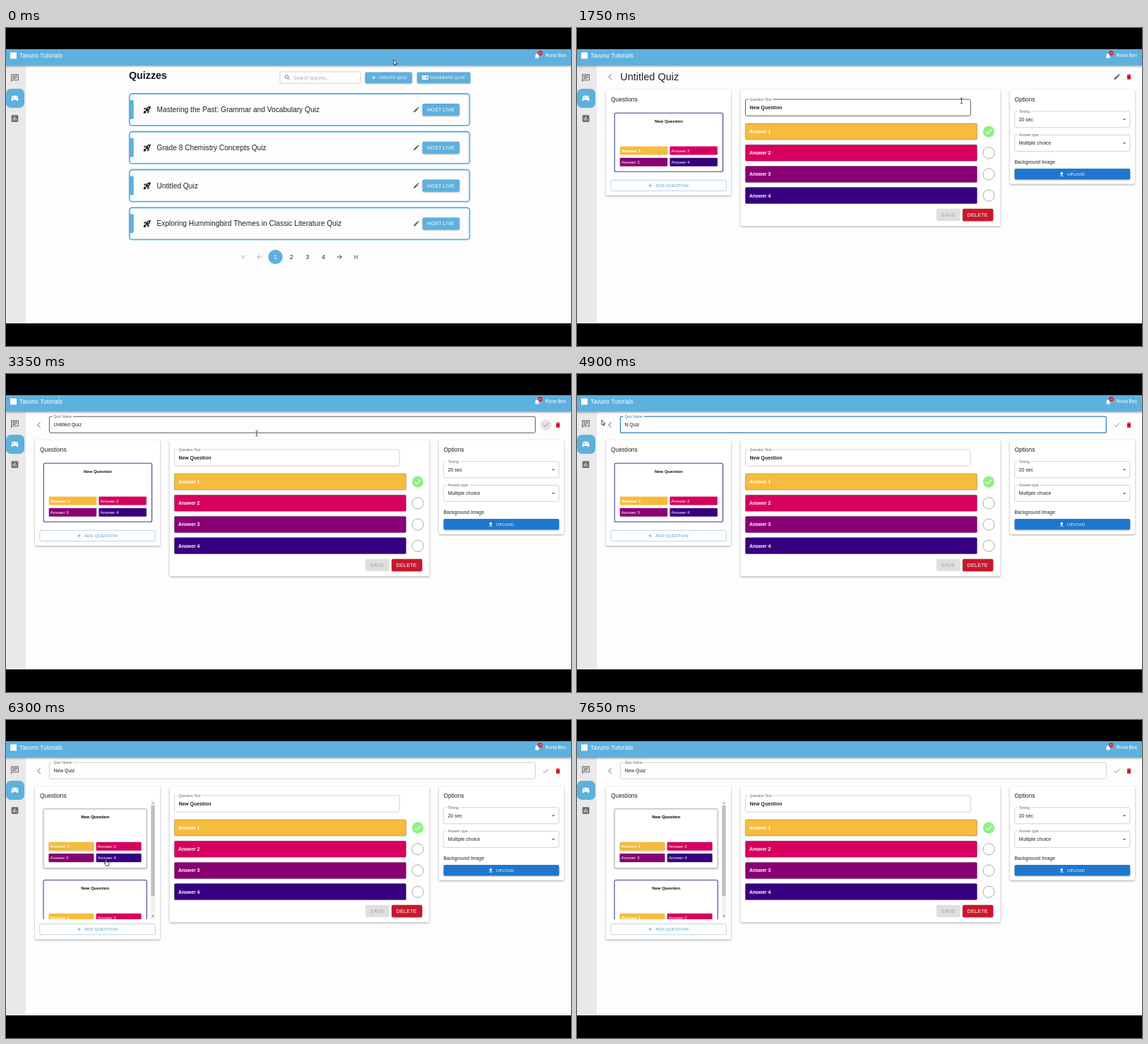
An HTML page with a canvas that plays this animation: 800 by 450 pixels, repeating every 7.7 s.

```html
<!DOCTYPE html>
<html lang="en">
<head>
<meta charset="utf-8">
<title>Quiz editor</title>
<style>
html, body { margin: 0; width: 100%; height: 100%; overflow: hidden; background: #000; }
canvas { display: block; width: 800px; height: 450px; }
</style>
</head>
<body>
<canvas id="stage"></canvas>
<script>
const LOOP = 7700;
const canvas = document.getElementById('stage');
const ctx = canvas.getContext('2d');
const dpr = window.devicePixelRatio || 1;
canvas.width = 800 * dpr;
canvas.height = 450 * dpr;

const BLUE = '#5eb0dd', INK = '#222', GREY = '#6b6b6b', LINE = '#c6c6c6', RED = '#c8182c';
const ANSWERS = ['#f6bc3d', '#d7005f', '#880073', '#370080'];
const TITLES = ['Mastering the Past: Grammar and Vocabulary Quiz', 'Grade 8 Chemistry Concepts Quiz',
  'Untitled Quiz', 'Exploring Hummingbird Themes in Classic Literature Quiz'];

// Moments of the story, in ms
const AT = { insert: 750, editor: 1450, rename: 3250, focus: 3950, drag: 4150,
  typeN: 4850, typeE: 5050, typeW: 5200, add: 5950 };

// Pointer path: time, x, y
const PATH = [
  [0, 549, 45], [100, 549, 46], [400, 541, 70], [750, 541, 70], [1200, 543.5, 93],
  [1750, 544.5, 103], [2050, 545, 104], [2450, 650, 112], [2900, 764, 69], [3250, 764, 70],
  [3350, 355, 84], [3900, 93, 73], [4150, 91, 72], [4650, 36, 66], [4900, 35, 65], [5250, 35, 65],
  [5800, 140, 224], [6000, 140, 223], [6300, 140, 197.5], [6700, 139, 190], [7300, 110, 18], [7700, 110, 10]
];

function text(s, x, y, size, color = INK, o = {}) {
  ctx.font = `${o.bold ? 'bold ' : ''}${size}px "Liberation Sans", Arial, sans-serif`;
  ctx.letterSpacing = (o.caps ? size * 0.028 : 0) + 'px';
  ctx.textAlign = o.align || 'left';
  ctx.fillStyle = color;
  ctx.fillText(s, x, y + size * 0.36);
}

function box(x, y, w, h, r, fill, stroke, lw = 1) {
  ctx.beginPath();
  ctx.roundRect(x, y, w, h, r);
  if (fill) { ctx.fillStyle = fill; ctx.fill(); }
  if (stroke) { ctx.strokeStyle = stroke; ctx.lineWidth = lw; ctx.stroke(); }
}

function raised(blur, alpha, draw) {
  ctx.save();
  ctx.shadowColor = `rgba(0,0,0,${alpha})`;
  ctx.shadowBlur = blur * dpr;
  ctx.shadowOffsetY = dpr;
  draw();
  ctx.restore();
}

function disc(x, y, r, fill, stroke) {
  ctx.beginPath();
  ctx.arc(x, y, r, 0, 7);
  if (fill) { ctx.fillStyle = fill; ctx.fill(); }
  if (stroke) { ctx.strokeStyle = stroke; ctx.lineWidth = 1; ctx.stroke(); }
}

// Icons live on a 24-unit grid; the second entry is a stroke width, 0 for filled
const ICONS = {
  edit: ['M3 17V21H7L18 10 14 6ZM15 5 18 2.5 21.5 6 19 9Z', 0],
  trash: ['M6 7H18V21H6ZM5 4H8.5L9.5 3H14.5L15.5 4H19V6H5Z', 0],
  check: ['M4 12.5 9 17.5 20 6.5', 2],
  plus: ['M12 5V19M5 12H19', 2],
  search: ['M15 9.5A5.5 5.5 0 1 1 4 9.5A5.5 5.5 0 1 1 15 9.5M14 14 20 20', 2.2],
  bell: ['M10 20H14A2 2 0 0 1 10 20M6 16V11C6 7 8 5 10.5 4.5A1.5 1.5 0 0 1 13.5 4.5C16 5 18 7 18 11V16L20 18V19H4V18Z', 0],
  chat: ['M3 3H21V17H5L3 19.5ZM6 7H18M6 10H18M6 13H14', 2],
  pad: ['M7.5 5H16.5Q20 5 20.5 8.5L21.6 16Q21.5 19 19 19 18 19 15 16H9Q6 19 5 19 2.5 19 2.4 16L3.5 8.5Q4 5 7.5 5Z', 0],
  chart: ['M5 3H19Q21 3 21 5V19Q21 21 19 21H5Q3 21 3 19V5Q3 3 5 3ZM7 10V17H9V10ZM11 7V17H13V7ZM15 13V17H17V13Z', 0],
  back: ['M20 12H5M12 5 5 12 12 19', 2],
  next: ['M4 12H19M12 5 19 12 12 19', 2],
  first: ['M7 6V18M17.5 6.5 12 12 17.5 17.5', 2],
  last: ['M17 6V18M6.5 6.5 12 12 6.5 17.5', 2],
  chevron: ['M15.5 3.5 7 12 15.5 20.5', 2.2],
  upload: ['M5 18H19V20H5ZM5 10H9V16H15V10H19L12 3Z', 0],
  drop: ['M7 10 12 15 17 10Z', 0],
  rocket: ['M7 13C9 8 13 2.5 21.3 2.7 21.5 11 16 15 11 17ZM9 6.5 5.6 12.2 2 10.7 6 6.6ZM17.5 15 11.8 18.4 13.3 22 17.5 18ZM2 22C2 18 3 15 6 15A3 3 0 0 1 9 18C9 21 6 22 2 22ZM13 9A2 2 0 0 0 17 9A2 2 0 0 0 13 9Z', 0]
};
for (const k in ICONS) ICONS[k][0] = new Path2D(ICONS[k][0]);

function icon(name, x, y, size, color) {
  const [path, lw] = ICONS[name];
  ctx.save();
  ctx.translate(x - size / 2, y - size / 2);
  ctx.scale(size / 24, size / 24);
  ctx.fillStyle = ctx.strokeStyle = color;
  ctx.lineWidth = lw;
  if (lw) ctx.stroke(path); else ctx.fill(path, 'evenodd');
  ctx.restore();
}

function button(x, y, w, h, fill) {
  raised(2, 0.35, () => box(x, y, w, h, 2, fill));
}

function card(x, y, w, h) {
  raised(3, 0.35, () => box(x, y, w, h, 2, '#fff'));
}

function field(x, y, w, h, label, value, o = {}) {
  box(x, y, w, h, 2, null, o.line || LINE, o.lw || 0.8);
  ctx.font = '5.1px "Liberation Sans", Arial, sans-serif';
  ctx.letterSpacing = '0px';
  ctx.fillStyle = '#fefefe';
  ctx.fillRect(x + 4, y - 2, ctx.measureText(label).width + 4, 4);
  text(label, x + 6, y, 5.1, o.label || '#666');
  text(value, x + 6, y + h / 2, 6.9, INK, { bold: o.bold });
}

function frame() {
  ctx.fillStyle = '#fdfdfe';
  ctx.fillRect(0, 30, 800, 388);
  ctx.fillStyle = '#e9e8ea';
  ctx.fillRect(0, 53, 28, 365);
  raised(3, 0.45, () => { ctx.fillStyle = BLUE; ctx.fillRect(0, 30, 800, 23); });
  ctx.fillStyle = '#fff';
  ctx.fillRect(6, 34.5, 9, 9);
  text('Tavuno Tutorials', 19, 39.2, 8.35, '#fff');
  icon('bell', 752, 39.5, 9.5, '#fff');
  disc(756.4, 35.5, 3.3, RED);
  text('10', 756.4, 35.5, 3.8, '#fff', { align: 'center' });
  text('Rona Bex', 763.5, 39, 6.75, '#fff');
  icon('chat', 12.5, 71, 13, GREY);
  box(0, 86, 26, 27, 7, BLUE);
  icon('pad', 12.5, 99.5, 12.5, '#fff');
  disc(10.3, 98.6, 1, BLUE);
  disc(14.8, 98.6, 0.8, BLUE);
  icon('chart', 12.5, 128, 13, GREY);
}

function listPage(t) {
  text('Quizzes', 174, 66.5, 14.3, '#161616', { bold: true });
  box(388, 62, 114, 16.4, 2, '#fff', LINE, 0.8);
  icon('search', 398.5, 70.2, 10, '#666');
  text('Search quizzes...', 407, 70.2, 6.75, '#a8a8a8');
  button(508.5, 62.5, 66.5, 15.5, BLUE);
  icon('plus', 520.5, 70.2, 9.5, '#fff');
  text('CREATE QUIZ', 527.3, 70.2, 5.85, '#fff', { caps: true });
  button(582, 62.5, 75.5, 15.5, BLUE);
  box(589, 67.3, 9, 5.8, 0.8, '#fff');
  disc(591.5, 70.2, 1, BLUE);
  ctx.fillRect(594.2, 68.8, 2.6, 2.6);
  text('GENERATE QUIZ', 600.3, 70.2, 5.85, '#fff', { caps: true });

  const rows = t < AT.insert ? TITLES : ['Untitled Quiz', ...TITLES];
  for (let i = 0; i < 4; i++) {
    const y = 93 + i * 53.75;
    box(174.8, y, 481.6, 45.2, 4, '#fefdfe', BLUE, 1.8);
    box(174.2, y + 9, 6.6, 27, [0, 2, 2, 0], BLUE);
    icon('rocket', 200, y + 22.5, 12.5, '#161616');
    text(rows[i], 213.5, y + 22.4, 10.2, INK);
    icon('edit', 581, y + 22.5, 10, GREY);
    button(589.7, y + 14, 52.5, 17, BLUE);
    text('HOST LIVE', 596.2, y + 22.6, 7.1, '#fff', { caps: true });
  }

  icon('first', 336.3, 324, 10.5, '#a4a4a4');
  icon('back', 359, 324, 10.5, '#a4a4a4');
  disc(381.5, 324, 10.2, BLUE);
  for (let n = 1; n < 5; n++)
    text(String(n), 358.8 + n * 22.65, 324, 8.4, n === 1 ? '#fff' : INK, { align: 'center' });
  icon('next', 472.2, 324, 10.5, INK);
  icon('last', 494.8, 324, 10.5, INK);
}

function mini(x, y, w, h, line) {
  box(x, y, w, h, 2, '#fff', line, 1.1);
  text('New Question', x + w / 2, y + 11.3, 6, '#111', { bold: true, align: 'center' });
  const pw = (w - 18.5) / 2;
  ANSWERS.forEach((c, i) => {
    const ax = i % 2 ? x + w - 7.7 - pw : x + 7.5;
    const ay = y + 47.3 + (i >> 1) * 16.2;
    box(ax, ay, pw, 12, 1, c);
    text('Answer ' + (i + 1), ax + 2, ay + 6, 6.25, '#fff', { bold: i === 0 });
  });
}

function questionPanel(added) {
  card(41, 87.5, 177, added ? 217 : 149.5);
  text('Questions', 48, 101, 8.4, INK);
  let y = 215.3;
  if (added) {
    y = 282.5;
    ctx.save();
    ctx.beginPath();
    ctx.rect(44, 106, 168, 170);
    ctx.clip();
    raised(2, 0.2, () => mini(53, 119.5, 146.3, 84, '#c2c2c2'));
    mini(53, 220.5, 146.3, 84, '#3b3f9c');
    ctx.fillStyle = '#f0f0f0';
    ctx.fillRect(205, 108, 6, 168);
    ctx.fillStyle = '#bfbfbf';
    ctx.fillRect(205.4, 115, 5.2, 128);
    icon('drop', 208, 271.5, 8, '#555');
    ctx.save();
    ctx.translate(208, 111.5);
    ctx.scale(1, -1);
    icon('drop', 0, 0, 8, '#999');
    ctx.restore();
    ctx.restore();
  } else {
    mini(53.2, 120.3, 153.4, 83, '#3b3f9c');
  }
  box(47.8, y, 163.6, 15.2, 2, '#fff', '#a9cbe0', 0.8);
  icon('plus', 103.5, y + 7.6, 8.5, '#4a9ac6');
  text('ADD QUESTION', 111, y + 7.6, 5.9, '#4a9ac6', { caps: true });
}

function answerPanel(hover) {
  card(231.7, 87.5, 367.8, 192.7);
  field(238.5, 101, 318.7, 23.3, 'Question Text', 'New Question', { bold: true, line: hover ? '#333' : LINE });
  ANSWERS.forEach((c, i) => {
    const y = 135 + i * 30.2;
    box(238.4, y, 328, 23, 1.5, c, 'rgba(0,0,0,.3)', 0.8);
    text('Answer ' + (i + 1), 244, y + 11.5, 6.8, '#fff', { bold: true });
    disc(583, y + 11.6, 8.1, i ? '#fff' : '#8df184', i ? '#aaa' : null);
  });
  icon('check', 583, 146.6, 13, '#fff');
  box(509, 255.7, 33.7, 17.3, 2, '#dfdfdf');
  text('SAVE', 515.7, 264.4, 7.2, '#a6a6a6', { caps: true });
  button(546, 255.7, 43.3, 17.3, RED);
  text('DELETE', 552.6, 264.4, 7.2, '#fff', { caps: true });
}

function optionPanel() {
  card(613, 87.5, 177, 133.3);
  text('Options', 619.5, 101, 8.4, INK);
  field(619.7, 117.8, 163.3, 23, 'Timing', '20 sec');
  field(619.7, 151.4, 163.3, 23, 'Answer type', 'Multiple choice');
  icon('drop', 775, 129.3, 11, '#666');
  icon('drop', 775, 162.9, 11, '#666');
  text('Background Image', 619.5, 190, 6.85, INK);
  button(619.6, 199, 163.6, 15.2, '#1e77cf');
  icon('upload', 686.3, 206.6, 8.5, '#fff');
  text('UPLOAD', 694, 206.6, 5.85, '#fff', { caps: true });
}

function quizName(t) {
  const word = t < AT.typeN ? 'Untitled' : t < AT.typeE ? 'N' : t < AT.typeW ? 'Ne' : 'New';
  return word + ' Quiz';
}

function nameField(t, p) {
  const focus = t >= AT.focus && t < AT.add;
  const line = focus ? '#2a7fb5' : t < AT.focus ? '#333' : LINE;
  field(61.4, 60.2, 688, 23, 'Quiz Name', quizName(t), { line, lw: focus ? 1.2 : 0.8, label: focus ? '#2a7fb5' : '#666' });
  if (t >= AT.drag && t < AT.typeN) {
    const left = Math.max(67.4, p.x);
    ctx.save();
    ctx.beginPath();
    ctx.rect(left, 67.5, Math.max(0, 91 - left), 8.6);
    ctx.clip();
    ctx.fillStyle = '#3577d4';
    ctx.fillRect(60, 60, 40, 20);
    text(quizName(t), 67.4, 71.7, 6.9, '#fff');
    ctx.restore();
  }
}

function editorPage(t, p) {
  const open = t >= AT.rename;
  const y = open ? 72 : 69;
  icon('chevron', 47, y, 10.5, '#555');
  if (open) nameField(t, p);
  else text('Untitled Quiz', 61.2, 69, 14.5, INK);

  const glow = t < AT.rename ? (t - 2800) / 150 : (3650 - t) / 250;
  if (glow > 0) disc(764.5, y, 7.8, `rgba(0,0,0,${0.1 * Math.min(1, glow)})`);
  icon(open ? 'check' : 'edit', 764.5, y, 10.5, '#666');
  icon('trash', 781.5, y, 10, RED);

  ctx.save();
  ctx.translate(0, open ? 6 : 0);
  questionPanel(t >= AT.add);
  answerPanel(t < 2150);
  optionPanel();
  ctx.restore();
}

function pointer(t) {
  let i = 0;
  while (i < PATH.length - 2 && PATH[i + 1][0] <= t) i++;
  const [t0, x0, y0] = PATH[i], [t1, x1, y1] = PATH[i + 1];
  const k = (t - t0) / (t1 - t0), e = k * k * (3 - 2 * k);
  return { x: x0 + (x1 - x0) * e, y: y0 + (y1 - y0) * e };
}

function pointerKind(t, p) {
  if (t < AT.editor) return p.y > 62 && p.y < 78 ? 'hand' : 'arrow';
  if (t < 2150) return 'beam';
  if (t < AT.rename) return p.x > 756 ? 'hand' : 'arrow';
  if (t < 5250) return p.x > 61 ? 'beam' : 'arrow';
  const onAdd = t < AT.add && p.y > 221;
  const onMini = t >= AT.add && p.y > 125 && p.y < 210;
  return onAdd || onMini ? 'hand' : 'arrow';
}

const SHAPES = {
  arrow: new Path2D('M0 0V7.2L1.7 5.7 2.8 8.2 3.9 7.7 2.8 5.3H5Z'),
  hand: new Path2D('M1 .3Q1.8-.4 2.4.5V3.3L5.4 4Q6 4.4 5.9 5.5L5.2 9H1.6L-.8 5.6Q-.8 4.6.1 4.9L1 5.7Z'),
  beam: new Path2D('M-1.6-3.6H-.4L0-3.2.4-3.6H1.6M0-3.2V3.2M-1.6 3.6H-.4L0 3.2.4 3.6H1.6')
};

function drawPointer(t, p) {
  const kind = pointerKind(t, p);
  ctx.save();
  ctx.translate(p.x, p.y);
  ctx.lineWidth = 0.8;
  ctx.strokeStyle = '#222';
  if (kind !== 'beam') {
    ctx.fillStyle = '#fff';
    ctx.fill(SHAPES[kind]);
  }
  ctx.stroke(SHAPES[kind]);
  ctx.restore();
}

function draw(t) {
  ctx.setTransform(dpr, 0, 0, dpr, 0, 0);
  ctx.fillStyle = '#000';
  ctx.fillRect(0, 0, 800, 450);
  ctx.save();
  ctx.beginPath();
  ctx.rect(0, 30, 800, 388);
  ctx.clip();
  const p = pointer(t);
  frame();
  if (t < AT.editor) listPage(t);
  else editorPage(t, p);
  drawPointer(t, p);
  ctx.restore();
}

const start = performance.now();
function tick() {
  draw((performance.now() - start) % LOOP);
  requestAnimationFrame(tick);
}
tick();
</script>
</body>
</html>
```
